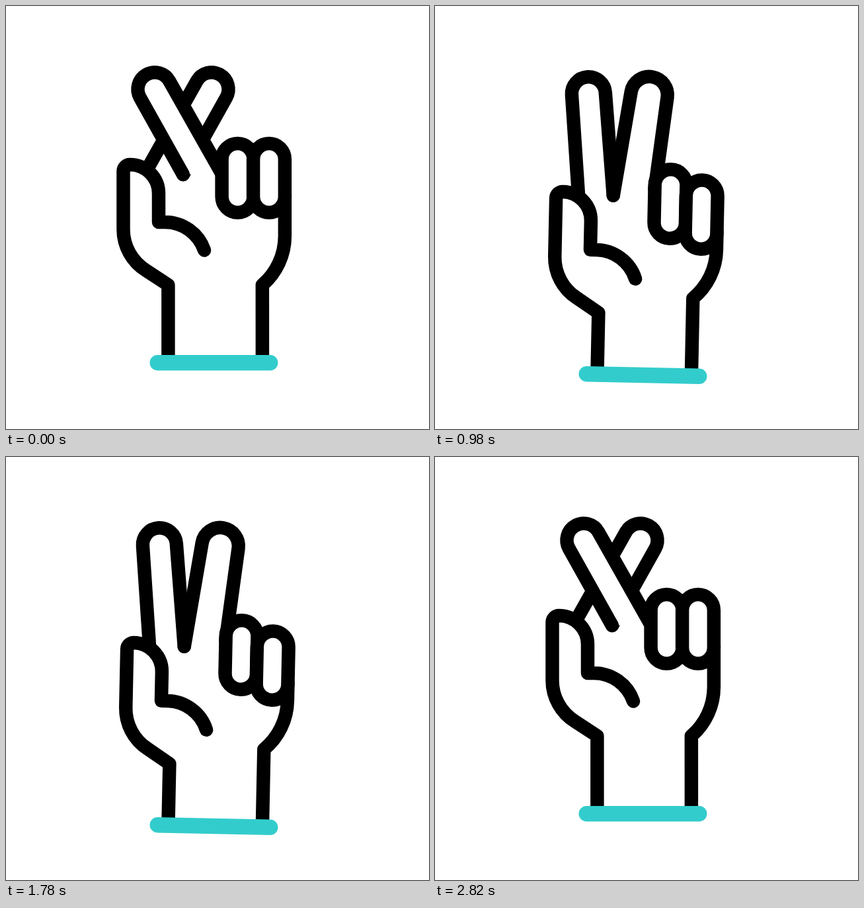
An HTML page with a canvas that plays this animation: 640 px wide and 640 px high, repeating every 3.2 s.

```html
<!DOCTYPE html>
<html lang="en">
<head>
<meta charset="utf-8">
<title>Crossed fingers</title>
<style>
  html, body { margin: 0; width: 100%; height: 100%; overflow: hidden; background: #fff; }
  canvas { display: block; }
</style>
</head>
<body>
<canvas id="stage" width="640" height="640"></canvas>
<script>
const ctx = document.getElementById('stage').getContext('2d');
const LOOP = 3200, BEAT = 400;
const INK = '#000', TEAL = '#33cccc';
const PIVOT = { x: 314.5, y: 539.75 };
const SLIM = 25.5;

// One value per beat, eased between beats.
const TILT  = [0, 0, 8.05, -7.9, 8.05, -7.9, 0, 0];
const DROP  = [0, 0, 37.7, -6.5, 37.7, -6.5, 0, 0];
const OPEN  = [0, 1, 1, 1, 1, 1, 1, 0];
const INDEX = [311, 231, 239.5, 202, 239.5, 202, 256.3, 311];
const MIDDLE = [225, 287.6, 323.5, 303.9, 323.5, 303.9, 301, 225];
const GIRTH = [SLIM, SLIM, 28.3, 27, 28.3, 27, SLIM, SLIM];

const clamp = v => Math.min(1, Math.max(0, v));
const ease = v => { const u = clamp(v); return u * u * (3 - 2 * u); };
const mix = (a, b, k) => a + (b - a) * k;

function track(keys, t) {
  const i = Math.min(Math.floor(t / BEAT), keys.length - 1);
  const next = Math.min(i + 1, keys.length - 1);
  return mix(keys[i], keys[next], ease(t / BEAT - i));
}

function ink() {
  ctx.fillStyle = '#fff';
  ctx.strokeStyle = INK;
  ctx.lineWidth = 20.5;
  ctx.lineCap = ctx.lineJoin = 'round';
}

function paint() {
  ctx.fill();
  ctx.stroke();
}

// Round tip joined to two base points by tangent lines.
function finger(left, tip, right, r) {
  const tangent = (b, side) => {
    const dx = b.x - tip.x, dy = b.y - tip.y;
    return Math.atan2(dy, dx) + side * Math.acos(r / Math.hypot(dx, dy));
  };
  ctx.beginPath();
  ctx.moveTo(left.x, left.y);
  ctx.arc(tip.x, tip.y, r, tangent(left, 1), tangent(right, -1));
  ctx.lineTo(right.x, right.y);
  paint();
}

function curled(x, y) {
  const r = 23.9;
  ctx.beginPath();
  ctx.arc(x, y + 232, r, Math.PI, 0);
  ctx.arc(x, y + 288.5, r, 0, Math.PI);
  ctx.closePath();
  paint();
}

function thumb(y) {
  const rad = Math.PI / 180;
  ctx.beginPath();
  ctx.moveTo(245.4, 532);
  ctx.lineTo(245.4, 422 + y);
  ctx.arc(250.8, 338 + y, 73.3, 122 * rad, Math.PI);
  ctx.arc(187.5, 250 + y, 10, Math.PI, 1.5 * Math.PI);
  ctx.arc(187.5, 283.5 + y, 43.5, -Math.PI / 2, 0);
  ctx.lineTo(231, 327 + y);
  ctx.arc(240.5, 390 + y, 63, -Math.PI / 2, -19 * rad);
  paint();
}

function heel(y) {
  ctx.beginPath();
  ctx.moveTo(421.9, 285 + y);
  ctx.arc(324.4, 348, 97.5, 0, 49.4 * Math.PI / 180);
  ctx.lineTo(387.9, 532);
  ctx.stroke();
}

function line(x1, y1, x2, y2, width) {
  ctx.strokeStyle = TEAL;
  ctx.lineWidth = width;
  ctx.lineCap = 'round';
  ctx.beginPath();
  ctx.moveTo(x1, y1);
  ctx.lineTo(x2, y2);
  ctx.stroke();
}

function hand(t) {
  const open = track(OPEN, t), girth = track(GIRTH, t);
  const fork = { x: mix(268, 264, open), y: mix(255, 269, open) };
  ctx.save();
  ctx.translate(PIVOT.x, PIVOT.y + track(DROP, t));
  ctx.rotate(track(TILT, t) * Math.PI / 180);
  ctx.translate(-PIVOT.x, -PIVOT.y);
  ink();
  finger({ x: mix(213, 211.3, open), y: mix(248, 269, open) },
         { x: track(INDEX, t), y: mix(126, 115.8, open) }, fork, SLIM);
  finger(fork, { x: track(MIDDLE, t), y: mix(126, 113.5, open) + girth - SLIM },
         { x: 326.5, y: mix(253.6, 258, open) }, girth);
  thumb(24.8 * open);
  heel(34.8 * open);
  curled(350.5, 19.7 * open);
  curled(398, 34.8 * open);
  line(229.25, PIVOT.y, 399.75, PIVOT.y, 23.5);
  ctx.restore();
}

// Each ray shoots outward, then its tail follows.
function ray(x1, y1, x2, y2, head, tail) {
  if (head <= 0 || tail >= 1) return;
  line(mix(x1, x2, tail), mix(y1, y2, tail), mix(x1, x2, head), mix(y1, y2, head), 21);
}

function sparks(t) {
  for (const start of [1000, 1800]) {
    const head = ease((t - start) / 200), tail = ease((t - start - 200) / 300);
    ray(123, 69.5, 106, 17, head, tail);
    ray(88, 93.2, 41, 62, head, tail);
  }
}

function draw(t) {
  ctx.fillStyle = '#fff';
  ctx.fillRect(0, 0, 640, 640);
  hand(t);
  sparks(t);
}

const begin = performance.now();
function tick() {
  draw((performance.now() - begin) % LOOP);
  requestAnimationFrame(tick);
}
tick();
</script>
</body>
</html>
```
